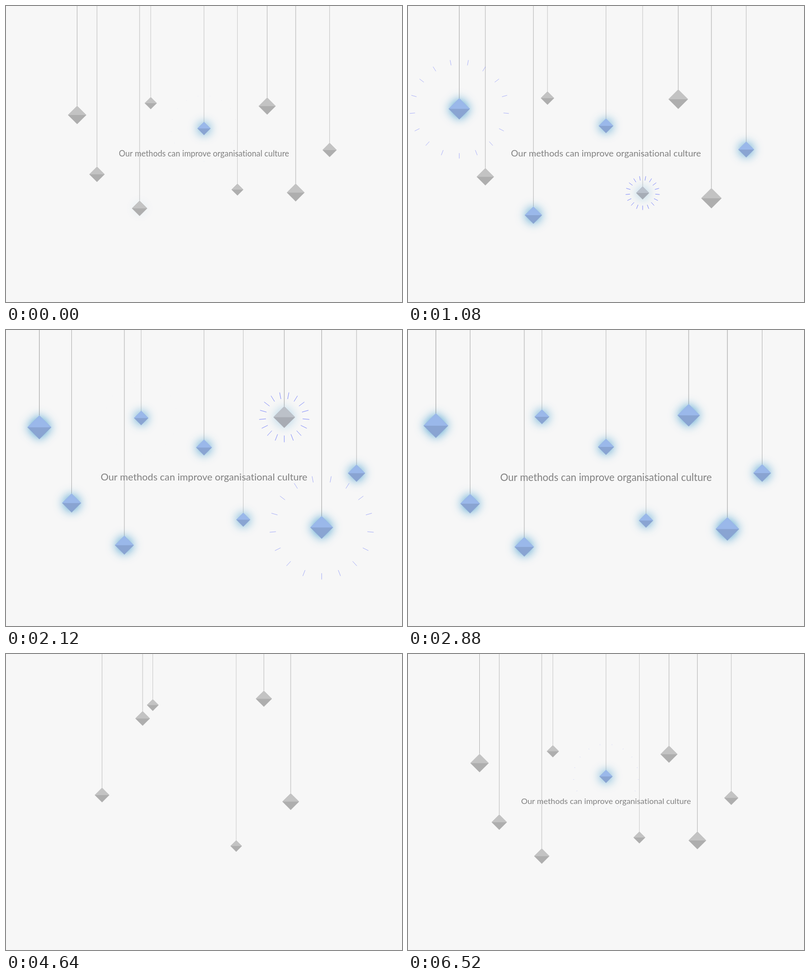
These frames come from a looping animation (800x600 px, 6560 ms). An HTML page with a canvas:

```html
<!DOCTYPE html>
<html lang="en">
<head>
<meta charset="utf-8">
<title>Hanging diamonds</title>
<style>
  html, body { margin: 0; width: 100%; height: 100%; overflow: hidden; background: #f7f7f7; }
  canvas { display: block; }
</style>
</head>
<body>
<canvas width="800" height="600"></canvas>
<script>
const ctx = document.querySelector('canvas').getContext('2d');
const LOOP = 6560, ENTRY = -2160, SIZE = 14.3;
const MESSAGE = 'Our methods can improve organisational culture';

// x, y from the stage centre, depth, drop time, lighting time
const diamonds = [
  [67.5, 72, 1.19, -2090, 940],
  [-107.5, -103, 1.16, -2015, 1530],
  [0, -51.5, 1.074, -1892, -570],
  [253.5, -8, 1, -1926, 224],
  [-130, 110, 0.924, -1973, -30],
  [-216, 41, 0.922, -2040, 1150],
  [127.5, -97, 0.83, -2020, 2000],
  [185, 78, 0.8, -2035, 1760],
  [-256, -79, 0.77, -1990, 700]
].map(([x, y, z, drop, lit]) => ({ x, y, z, drop, lit }));

const clamp = v => Math.max(0, Math.min(1, v));
const cubicInOut = p => p < 0.5 ? 4 * p ** 3 : 1 - 4 * (1 - p) ** 3;
const mix = (a, b, k) => `rgb(${a.map((v, i) => Math.round(v + (b[i] - v) * k))})`;

// Fall from above the stage, then a damped swing around the rest height
function dropOffset(age) {
  const p = age / 2000;
  const swing = 204 * 2 ** (-10 * p) * Math.sin((p - 0.075) * 2 * Math.PI / 0.3);
  return swing - 300 * (1 - clamp(age / 150)) ** 2;
}

function polygon(...points) {
  ctx.beginPath();
  points.forEach(([x, y]) => ctx.lineTo(x, y));
  ctx.closePath();
  ctx.fill();
}

function drawDiamond(x, y, r, glow) {
  const left = [x - r, y], right = [x + r, y], top = [x, y - r], bottom = [x, y + r];
  const tint = glow ** 2;
  ctx.fillStyle = mix([174, 174, 174], [137, 164, 210], tint);
  if (glow > 0) {
    ctx.shadowBlur = 20;
    ctx.shadowColor = `rgba(15,130,195,${0.8 * glow})`;
  }
  polygon(left, top, right, bottom);
  ctx.shadowBlur = 0;
  ctx.shadowColor = 'transparent';
  ctx.fillStyle = mix([195, 195, 195], [154, 184, 234], tint);
  polygon(left, top, right);
}

function drawBurst(x, y, scale, u) {
  if (u <= 0 || u >= 1) return;
  const outer = 72 * scale * (1 - (1 - u) ** 3);
  const inner = 72 * scale * (1 - (1 - u) ** 2);
  ctx.strokeStyle = `rgba(130,140,250,${clamp(1.5 * (1 - u))})`;
  ctx.lineWidth = 1;
  ctx.beginPath();
  for (let i = 0; i < 17; i++) {
    const a = i * 2 * Math.PI / 17, sx = Math.sin(a), cy = Math.cos(a);
    ctx.moveTo(x + inner * sx, y + inner * cy);
    ctx.lineTo(x + outer * sx, y + outer * cy);
  }
  ctx.stroke();
}

function draw(time) {
  const t = time > LOOP + ENTRY ? time - LOOP : time;
  const camera = -0.045 + 0.2455 * cubicInOut(clamp((t - ENTRY) / 6000));
  const lift = t > 3320 ? 6.4e-4 * (t - 3320) ** 2 : 0;

  ctx.fillStyle = '#f7f7f7';
  ctx.fillRect(0, 0, 800, 600);

  for (const d of diamonds) {
    const age = t - d.drop;
    if (age < 0) continue;
    const scale = 1 / (d.z - camera), r = SIZE * scale;
    const x = 400 + d.x * d.z * scale;
    const y = 300 + (d.y * d.z + dropOffset(age) - lift) * scale;
    if (y + r < -25) continue;
    ctx.strokeStyle = '#999';
    ctx.lineWidth = 0.58 * scale;
    ctx.beginPath();
    ctx.moveTo(x, 0);
    ctx.lineTo(x, y - r);
    ctx.stroke();
    drawBurst(x, y, scale, (t - d.lit) / 650);
    drawDiamond(x, y, r, clamp((t - d.lit) / 300));
  }

  const scale = 1 / (1 - camera);
  ctx.save();
  ctx.globalAlpha = clamp((t + 860) / 600);
  ctx.translate(400, 300 - lift * scale);
  ctx.scale(scale, scale);
  ctx.font = '16.3px Lato, sans-serif';
  ctx.letterSpacing = '0.01px'; // keeps "ti" from joining
  ctx.textAlign = 'center';
  ctx.fillStyle = '#808080';
  ctx.fillText(MESSAGE, 0, 4.5);
  ctx.restore();
}

const start = performance.now();
function frame() {
  draw((performance.now() - start) % LOOP);
  requestAnimationFrame(frame);
}
frame();
</script>
</body>
</html>
```
